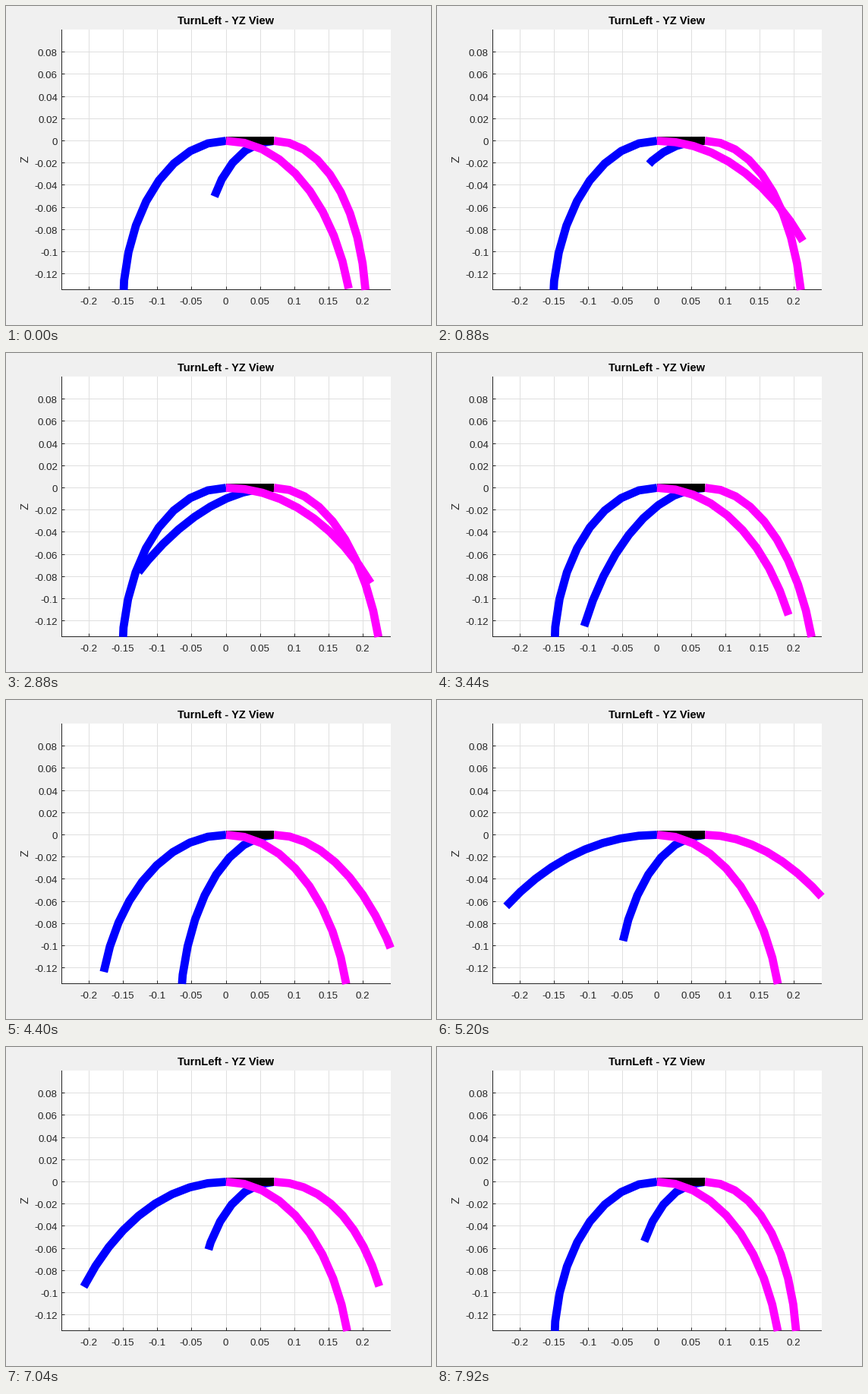
A matplotlib script for the animation above (8 s loop, 560x420 px).

```python
import numpy as np
import matplotlib.pyplot as plt
from matplotlib.animation import FuncAnimation

W, H, DPI = 560, 420, 100
FRAMES, INTERVAL = 100, 80
PX = 72 / DPI                                # points per pixel

LEFT, RIGHT, TOP, BOTTOM = 73.5, 506.5, 31, 373.5
X0, Y0, SX, SY = 290, 177.5, 904, 1462       # data origin and scale in pixels
Y_MAX, Z_MIN, DEPTH_MAX = 0.2397, -0.1343, 0.075

LENGTH, SEGMENTS, BODY = 0.24, 9, 0.07
INK, GRID, LIMB_PX = "#262626", "#dfdfdf", 10.8

# Bend in degrees: stance value, lift, then sideways sweep terms
BLUE_GAIT = dict(rest=90, lift=70.5, mid=4.5, sweep=19.5, bulge=3)
PINK_GAIT = dict(rest=75, lift=45.5, mid=-1.5, sweep=12.5, bulge=-2)

# side, base, half-cycle offset, sideways loop, forward/sideways/depth share in view
LIMBS = [
    dict(color="blue", gait=BLUE_GAIT, side=-1, base=0, late=1, loop=11,
         fwd=1.0, lat=0.02),
    dict(color="blue", gait=BLUE_GAIT, side=-1, base=BODY, late=0, loop=18,
         fwd=0.837, lat=-0.547, depth=0.547),
    dict(color="magenta", gait=PINK_GAIT, side=1, base=0, late=0, loop=11,
         fwd=1.0, lat=0.02),
    dict(color="magenta", gait=PINK_GAIT, side=1, base=BODY, late=1, loop=7.5,
         fwd=0.837, lat=0.547),
]


def px(y):
    return X0 + SX * np.asarray(y)


def py(z):
    return Y0 - SY * np.asarray(z)


def bends(gait, loop, phase):
    """Downward and sideways bend; phase 0..1 is swing, 1..2 is stance."""
    if phase >= 1:
        return gait["rest"], gait["mid"] + gait["sweep"] * (2 * (phase - 1) - 1)
    arch = np.sin(np.pi * phase)
    down = gait["rest"] - gait["lift"] * arch ** 1.17
    across = (gait["mid"] + gait["sweep"] * np.cos(np.pi * phase)
              + loop * np.sin(2 * np.pi * phase) + gait["bulge"] * arch)
    return down, across


def clip(points, depth):
    """Cut the polyline where it first leaves the axes box."""
    y, z = points.T
    over = np.stack([np.abs(y) - Y_MAX, Z_MIN - z, depth - DEPTH_MAX])
    for i in range(1, len(points)):
        out = over[:, i] > 0
        if out.any():
            a, b = over[out, i - 1], over[out, i]
            t = np.min(a / (a - b))
            cut = points[i - 1] + t * (points[i] - points[i - 1])
            return np.vstack([points[:i], cut])
    return points


def limb_points(limb, frame):
    phase = ((frame + 1) / 50 + limb["late"]) % 2
    down, across = bends(limb["gait"], limb["loop"], phase)
    total = np.hypot(down, across)
    radius = LENGTH / np.radians(total)
    angle = np.radians(total) * np.linspace(0, 1, SEGMENTS + 1)
    ahead = radius * np.sin(angle)
    bent = radius * (1 - np.cos(angle))
    aside = bent * across / total
    y = limb["base"] + limb["side"] * (limb["fwd"] * ahead + limb["lat"] * aside)
    z = -bent * down / total
    depth = np.zeros_like(y)
    if "depth" in limb:
        depth = limb["depth"] * ahead + limb["fwd"] * aside
    return clip(np.column_stack([y, z]), depth)


fig = plt.figure(figsize=(W / DPI, H / DPI), dpi=DPI, facecolor="#f0f0f0")
ax = fig.add_axes([0, 0, 1, 1])
ax.set_xlim(0, W)
ax.set_ylim(H, 0)
ax.axis("off")
ax.add_patch(plt.Rectangle((73, 31), 434, 343, fc="white", ec="none", zorder=0))


def rule(xs, ys, color, z):
    ax.plot(xs, ys, color=color, lw=PX, zorder=z, solid_capstyle="butt", snap=False)


def label(x, y, text, size, **kw):
    kw = {"color": INK, "ha": "center", "va": "center_baseline", **kw}
    ax.text(x, y, text, fontsize=size * PX, family="Liberation Sans", **kw)


for k in range(-4, 5):
    x = np.floor(px(k * 0.05)) + 0.5
    rule([x, x], [TOP, BOTTOM], GRID, 1)
    rule([x, x], [BOTTOM - 4, BOTTOM], INK, 1.5)
    label(x - 1, 388.5, f"{k * 0.05:.2g}", 13.33)

for k in range(-6, 5):
    y = np.floor(py(k * 0.02)) + 0.5
    rule([LEFT, RIGHT], [y, y], GRID, 1)
    rule([LEFT, LEFT + 4], [y, y], INK, 1.5)
    label(68, y + 1, f"{k * 0.02:.2g}", 13.33, ha="right")

rule([LEFT, LEFT], [TOP, BOTTOM + 0.5], INK, 1.5)
rule([LEFT - 0.5, RIGHT + 0.5], [BOTTOM, BOTTOM], INK, 1.5)
label(290, 24, "TurnLeft - YZ View", 14.67, weight="bold", color="black",
      va="baseline")
label(25, 202, "Z", 14.67, rotation=90, va="center")


def thick(color, z):
    line, = ax.plot([], [], color=color, lw=LIMB_PX * PX, zorder=z, snap=False,
                    solid_capstyle="butt", solid_joinstyle="miter")
    return line


lines = [thick(limb["color"], 2 if limb["color"] == "blue" else 4) for limb in LIMBS]
thick("black", 3).set_data(px([0, BODY]), py([0, 0]))


def update(frame):
    for line, limb in zip(lines, LIMBS):
        y, z = limb_points(limb, frame).T
        line.set_data(px(y), py(z))
    return lines


anim = FuncAnimation(fig, update, frames=FRAMES, interval=INTERVAL,
                     repeat=True, repeat_delay=0, blit=False)
plt.show()
```
